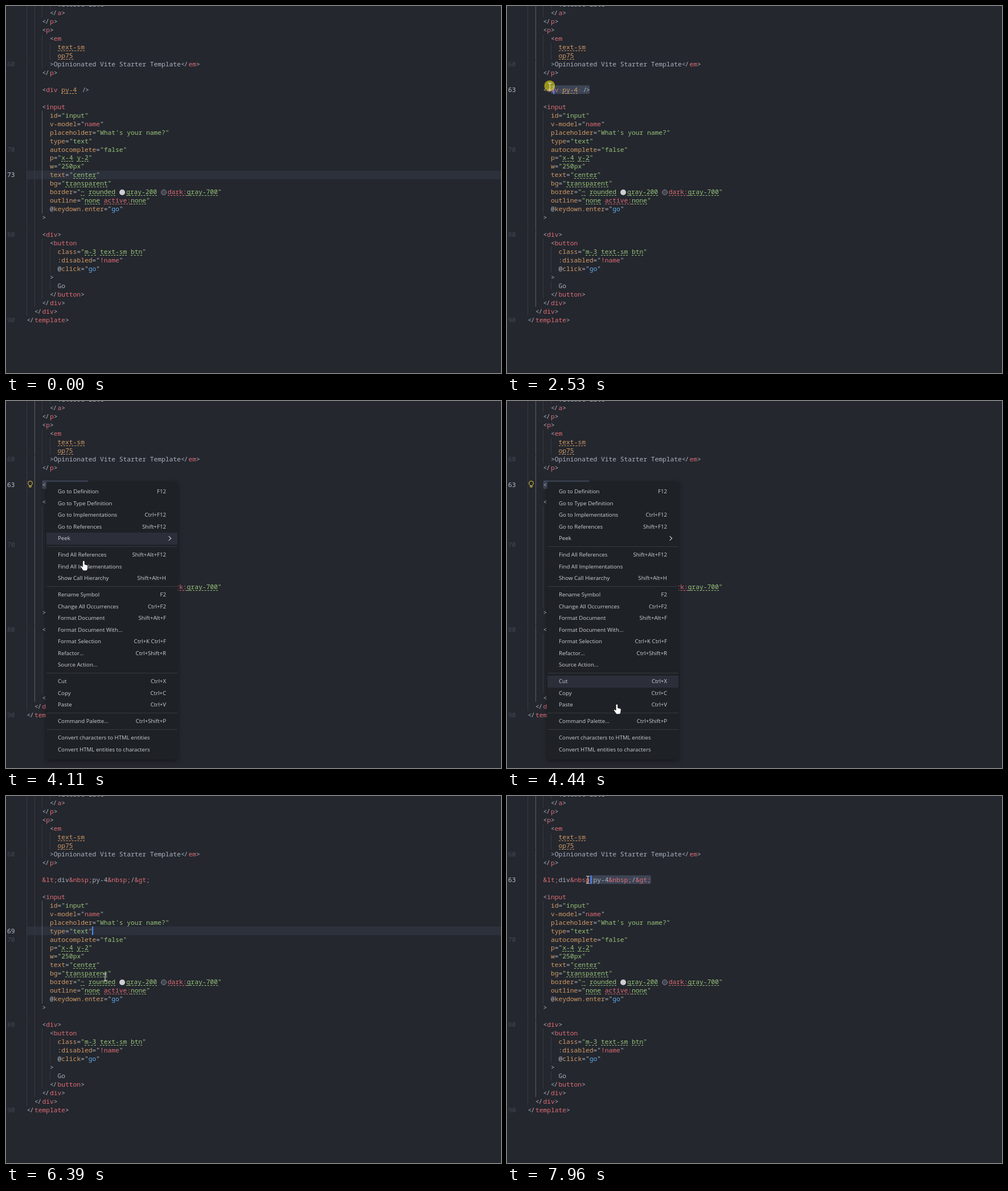
An HTML page that plays this animation: 869x644 px, repeating every 8000 ms.

```html
<!DOCTYPE html>
<html lang="en">
<head>
<meta charset="utf-8">
<title>Editor: converting a selection to HTML entities</title>
<style>
  html, body { margin: 0; width: 100%; height: 100%; overflow: hidden; background: #24272e; }
  #stage {
    position: relative; width: 869px; height: 644px; overflow: hidden;
    color: #abb2bf; font: 500 11.28px/15px "Noto Sans Mono", monospace;
    font-variant-ligatures: none;
  }
  #stage div, #stage svg { position: absolute; }
  .row { left: 36.5px; white-space: pre; }
  .num { left: 2px; color: #434954; }
  .num.on { color: #bcc2cc; }
  .r { color: #e06c75; }
  .o { color: #d19a66; }
  .g { color: #98c379; }
  .b { color: #61afef; }
  .u { display: inline-block; height: 14px; border-bottom: 1px dashed; }
  .open, .close { display: inline-block; width: 2ch; letter-spacing: -1.2px; }
  .close { text-align: right; text-indent: 1px; }
  .s, .d {
    display: inline-block; box-sizing: border-box; width: 10px; height: 10px;
    margin-right: 2.1px; border-radius: 50%; vertical-align: -2px;
  }
  .s { background: #cdced0; }
  .d { background: #404550; border: 1px solid #7f8288; }
  .guide { width: 1px; background: #353a42; }
  .guide.on { background: #5a5e65; }
  #band { left: 36.5px; right: 0; height: 15px; background: #2c313c; }
  #sel { left: 0; top: 0; height: 15px; background: #3d4555; border-radius: 2px; overflow: hidden; }
  #dots { right: 0; white-space: pre; color: #6b7280; }
  #caret { left: 0; top: 0; width: 1.5px; height: 15px; background: #528bff; }
  #menu {
    left: 71px; top: 142px; width: 230px; height: 487px;
    background: #1e2126; box-shadow: 0 2px 8px rgba(0, 0, 0, .45);
    font: 9.7px/20.5px "Open Sans", "Noto Sans", sans-serif; color: #cdd0d6;
  }
  .item { left: 0; width: 190px; height: 20.5px; padding: 0 20px; display: flex; justify-content: space-between; }
  .item.on { background: #2c2f3a; }
  .rule { left: 0; width: 100%; height: 1px; background: #363a40; }
  .more::after {
    content: ""; position: absolute; left: 212px; top: 7px; width: 5px; height: 5px;
    border: solid #d0d3d9; border-width: 1px 1px 0 0; transform: rotate(45deg);
  }
  #press {
    left: -10.5px; top: -11px; width: 19px; height: 19px;
    border-radius: 50%; background: rgba(226, 214, 20, .62);
  }
  #beam, #hand { left: 0; top: 0; overflow: visible; width: 1px; height: 1px; }
</style>
</head>
<body>
<div id="stage">
  <div id="band"></div>
  <div id="sel"><div id="dots"></div></div>
  <div id="code"></div>
  <div id="caret"></div>
  <svg id="bulb" style="left:37px;top:139px" width="11" height="14" fill="none" stroke="#e8cf4a">
    <path d="M3.9 9.2Q1.6 7.6 1.6 5.3a3.9 3.9 0 0 1 7.8 0Q9.4 7.6 7.1 9.2V12H3.9ZM3.9 9.6H7.1"/>
  </svg>
  <div id="menu"></div>
  <div id="press"></div>
  <svg id="beam" fill="none" stroke="#e4e4e4" stroke-width="1.1">
    <path d="M-3-6.2H-.8L0-5.6.8-6.2H3M-3 6.2H-.8L0 5.6.8 6.2H3M0-5.6V5.6"/>
  </svg>
  <svg id="hand" fill="#fff" stroke="#1b1d21" stroke-width=".8">
    <path d="M-1.7 1.6a1.7 1.7 0 0 1 3.4 0V6.5l4.2 1q1.6.5 1.5 2.2l-.7 5Q6.2 17.5 4 17.5H.5q-1.2 0-2-1.2L-5.2 11q-.6-1.4.8-1.8 1.2-.1 2.7 1.6Z"/>
  </svg>
</div>
<script>
const LOOP = 8000, CW = 6.77, LH = 14.95, LEFT = 36.5, FIRST = 53;
const TEXT_X = LEFT + 4 * CW;
const rowTop = n => 94.5 + (n - 60) * LH;
const $ = id => document.getElementById(id);

// [r text] is a coloured run; a capital letter adds the dashed underline.
const lines = `        Vitesse Lite
      </[r a]>
    </[r p]>
    <[r p]>
      <[r em]
        [O text-sm]
        [O op75]
      >Opinionated Vite Starter Template</[r em]>
    </[r p]>

    <[r div] [O py-4] />

    <[r input]
      [o id]=[g "input"]
      [o v-model]="[r name]"
      [o placeholder]=[g "What's your name?"]
      [o type]=[g "text"]
      [o autocomplete]=[g "false"]
      [o p]=[g "][G x-4] [G y-2][g "]
      [o w]=[g "250px"]
      [o text]=[g "][G center][g "]
      [o bg]=[g "][G transparent][g "]
      [o border]=[g "][G ~] [G rounded] [s ][G gray-200] [d ][R dark:][G gray-700][g "]
      [o outline]=[g "][G none] [R active:][G none][g "]
      @[o keydown.enter]="[b go]"
    >

    <[r div]>
      <[r button]
        [o class]=[g "][G m-3] [G text-sm] [G btn][g "]
        :[o disabled]="[r !name]"
        @[o click]="[b go]"
      >
        Go
      </[r button]>
    </[r div]>
  </[r div]>
</[r template]>`.split("\n");
const entityLine = "    [r &lt;]div[r &nbsp;]py-4[r &nbsp;]/[r &gt;]";

const toHtml = s => s
  .replace(/&/g, "&amp;").replace(/</g, "&lt;").replace(/>/g, "&gt;")
  .replace(/&lt;\//g, '<span class="open">$&</span>')
  .replace(/\/&gt;/g, '<span class="close">$&</span>')
  .replace(/\[(\w) ([^\]]*)\]/g, (_, k, text) =>
    `<span class="${k.toLowerCase()}${k < "a" ? " u" : ""}">${text}</span>`);

function add(parent, cls, style, html = "") {
  const el = document.createElement("div");
  el.className = cls;
  for (const k in style) el.style[k] = style[k] + "px";
  el.innerHTML = html;
  parent.append(el);
  return el;
}

// Blank lines take the indent of the line above.
const indents = [];
lines.forEach((s, i) => indents.push(s ? s.search(/\S/) : indents[i - 1]));

const guides = [];
indents.forEach((indent, i) => {
  for (let col = 0; col < indent; col += 2) {
    const left = Math.round(LEFT + col * CW - .5);
    guides.push({ i, col, el: add($("code"), "guide", { left, top: rowTop(FIRST + i), height: LH }) });
  }
});

// The innermost block around a line lights up its guide.
function lightGuides(line) {
  const at = line - FIRST, col = indents[at] - 2;
  let a = at, b = at;
  while (indents[a - 1] > col) a--;
  while (indents[b + 1] > col) b++;
  for (const g of guides) g.el.classList.toggle("on", g.col === col && g.i >= a && g.i <= b);
}

const addRow = (n, s) => add($("code"), "row", { top: rowTop(n) - .5 }, toHtml(s));
const rows = lines.map((s, i) => addRow(FIRST + i, s));
const nums = lines.map((s, i) => add($("code"), "num", { top: rowTop(FIRST + i) - .5 }, FIRST + i));
const tagRow = rows[63 - FIRST], entityRow = addRow(63, entityLine);

const groups = [
  ["Go to Definition|F12", "Go to Type Definition", "Go to Implementations|Ctrl+F12",
   "Go to References|Shift+F12", "Peek"],
  ["Find All References|Shift+Alt+F12", "Find All Implementations", "Show Call Hierarchy|Shift+Alt+H"],
  ["Rename Symbol|F2", "Change All Occurrences|Ctrl+F2", "Format Document|Shift+Alt+F",
   "Format Document With...", "Format Selection|Ctrl+K Ctrl+F", "Refactor...|Ctrl+Shift+R", "Source Action..."],
  ["Cut|Ctrl+X", "Copy|Ctrl+C", "Paste|Ctrl+V"],
  ["Command Palette...|Ctrl+Shift+P"],
  ["Convert characters to HTML entities", "Convert HTML entities to characters"]
];
const items = [];
let menuY = 7.4;
groups.forEach((group, i) => {
  if (i) {
    add($("menu"), "rule", { top: menuY + 3 });
    menuY += 8.5;
  }
  for (const entry of group) {
    const [label, key = ""] = entry.split("|");
    const el = add($("menu"), "item" + (label === "Peek" ? " more" : ""), { top: menuY },
      `<span>${label}</span><span>${key}</span>`);
    items.push({ el, top: 142 + menuY });
    menuY += 20.5;
  }
});

const smooth = k => k * k * (3 - 2 * k);
const slowing = k => 1 - (1 - k) ** 1.7;
const linear = k => k;

// Each move goes from the last place to x, y; bow bends it sideways.
const moves = [
  { from: 0, to: 820, x: 94, y: 136, bow: -20 },
  { from: 950, to: 1130, x: 158, y: 147 },
  { from: 1220, to: 1300, x: 167, y: 147 },
  { from: 1500, to: 2880, x: 65.5, y: 141, ease: slowing },
  { from: 3210, to: 3360, x: 72, y: 143 },
  { from: 3800, to: 4620, x: 196, y: 590, bow: 29 },
  { from: 5340, to: 5960, x: 246.5, y: 244 },
  { from: 6260, to: 6390, x: 174, y: 318 },
  { from: 6490, to: 6850, x: 278, y: 153.5 },
  { from: 7090, to: 7870, x: 142, y: 147, ease: linear }
];
const presses = [[1450, 3040], [3700, 3780], [4920, 4980], [5990, 6090], [7060, 7960]];

const clamp = (v, a, b) => Math.min(b, Math.max(a, v));

function pointer(t) {
  let x = 850, y = 662;
  for (const { from, to, x: tx, y: ty, bow = 0, ease = smooth } of moves) {
    if (t < from) break;
    const k = ease(clamp((t - from) / (to - from), 0, 1));
    const dx = tx - x, dy = ty - y;
    const side = 4 * k * (1 - k) * bow / Math.hypot(dx, dy);
    x += dx * k + dy * side;
    y += dy * k - dx * side;
  }
  return [x, y];
}

const show = (el, on) => { el.style.display = on ? "" : "none"; };
const move = (el, x, y) => { el.style.transform = `translate(${x}px, ${y}px)`; };

function render(t) {
  const [x, y] = pointer(t);
  const line = t < 1470 ? 73 : t < 6020 ? 63 : t < 7070 ? 69 : 63;
  const converted = t >= 5280;
  const length = converted ? 28 : 12;
  const dragging = line === 63 && (t < 3040 || t >= 7070);
  const start = dragging ? clamp(Math.round((x - TEXT_X) / CW), 0, length) : 0;
  const selected = line === 63 && start < length;
  const menuOpen = t >= 3740 && t < 4980;

  show(tagRow, !converted);
  show(entityRow, converted);
  nums.forEach((el, i) => {
    const n = FIRST + i;
    el.classList.toggle("on", n === line);
    show(el, n % 10 === 0 || n === line);
  });
  lightGuides(line);

  show($("band"), !selected);
  $("band").style.top = rowTop(line) + "px";
  show($("sel"), selected);
  $("sel").style.width = (length - start) * CW + "px";
  move($("sel"), TEXT_X + start * CW, rowTop(63));
  $("dots").textContent = converted ? "" : "    ·    ·  ";

  // The caret glides a little behind the pointer while dragging.
  const blinkFrom = t < 4980 ? 2800 : t < 6020 ? 4980 : 6020;
  const moving = dragging && (t < 2800 || t >= 7070);
  show($("caret"), line !== 73 && !menuOpen && (moving || (t - blinkFrom) % 1000 < 500));
  const caretX = line === 69 ? LEFT + 17 * CW
    : dragging ? clamp(pointer(t - 120)[0], TEXT_X, TEXT_X + length * CW) : TEXT_X;
  move($("caret"), caretX - .5, rowTop(line));

  show($("bulb"), t >= 3050 && !converted);

  show($("menu"), menuOpen);
  const hoverY = pointer(t - 55)[1];
  const hover = items.filter(item => item.top <= hoverY).pop();
  for (const item of items) item.el.classList.toggle("on", item === hover);

  const onMenu = menuOpen && y > 149;
  show($("hand"), onMenu);
  show($("beam"), !onMenu);
  show($("press"), presses.some(([a, b]) => t >= a && t < b));
  for (const id of ["hand", "beam", "press"]) move($(id), x, y);
}

const begin = performance.now();
function tick() {
  render((performance.now() - begin) % LOOP);
  requestAnimationFrame(tick);
}
tick();
</script>
</body>
</html>
```
